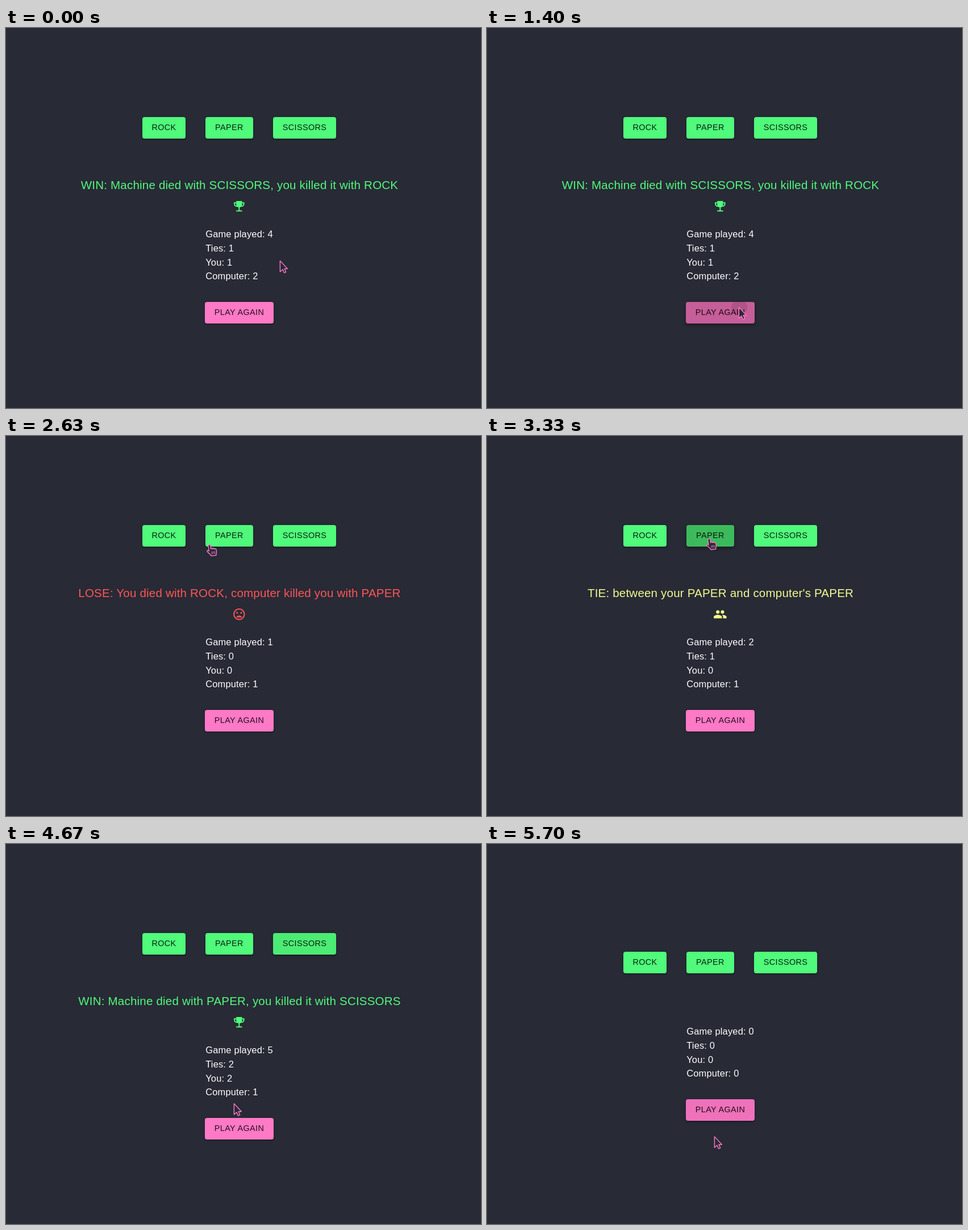
Recreate the animation shown at these times as an HTML page. Size 836 px wide and 670 px high, loop 5.77 s.

```html
<!DOCTYPE html>
<html lang="en">
<head>
<meta charset="utf-8">
<title>Rock Paper Scissors</title>
<style>
  html, body { margin: 0; width: 100%; height: 100%; overflow: hidden; background: #282a36; }
  body { position: relative; font-family: "Liberation Sans", Arial, sans-serif; cursor: default; }
  body > * { position: absolute; }
  .btn {
    height: 38px; line-height: 36.8px; border-radius: 4px; text-align: center;
    font-size: 14.4px; letter-spacing: .41px; color: rgba(0, 0, 0, .87);
  }
  #msg {
    left: 0; width: 822px; top: 261px; line-height: 31px; text-align: center;
    font-size: 20.55px; letter-spacing: .185px; white-space: nowrap;
  }
  #icon { left: 398.2px; top: 301.9px; fill: currentColor; }
  #icon .line { fill: none; stroke: currentColor; stroke-width: 2; }
  #stats {
    left: 351.2px; line-height: 24.65px; white-space: pre;
    font-size: 16.43px; letter-spacing: .19px; color: #fff;
  }
  #cursor {
    left: 0; top: 0; overflow: visible; fill: #282a36;
    stroke: #ff79c6; stroke-width: 1.4; stroke-linejoin: round;
  }
</style>
</head>
<body>
<div id="msg"></div>
<svg id="icon" width="24.65" height="24.65" viewBox="0 0 24 24"></svg>
<div id="stats"></div>
<svg id="cursor" width="24" height="24">
  <path id="arrow" transform="translate(-.6 -.6)" d="M0 0V19.3L4.5 15.4 7.2 21.4 10.3 20 7.7 14.1H13Z"/>
  <g id="hand" transform="translate(-1.5 .8) rotate(-8)">
    <path d="M-2 2C-2-.6 2-.6 2 2V8C2 6 5 6 5.2 8.3 5.5 6.8 8 7 8.2 9 8.6 8 11 8 11 10.5V14C11 16 9.5 17 9.5 20H1C0 17-3 15-5 11.5-6 9.5-4 8.5-2 11Z"/>
    <path d="M2.6 12.5v4.5M5.1 12.5v4.5M7.6 12.5v4.5" stroke-width="1"/>
  </g>
</svg>
<script>
const LOOP = 5770, SHIFT = 33.2, HEIGHT = 38;
const CLICK_DELAY = 140, HOVER_LAG = 110;
const GREEN = [80, 250, 123], PINK = [255, 121, 198];
const BEATS = { ROCK: 'SCISSORS', PAPER: 'ROCK', SCISSORS: 'PAPER' };
const $ = id => document.getElementById(id);

const KINDS = {
  WIN: ['#50fa7b', '<path d="M7 3h10v6a5 5 0 0 1-4 5v5h4v2H7v-2h4v-5a5 5 0 0 1-4-5z"/><path class="line" d="M7 6H4v2a4 4 0 0 0 4 4M17 6h3v2a4 4 0 0 1-4 4"/>'],
  LOSE: ['#ff5555', '<circle class="line" cx="12" cy="12" r="9"/><circle cx="8.5" cy="9.5" r="1.5"/><circle cx="15.5" cy="9.5" r="1.5"/><path d="M6.9 17.5a5.5 5.5 0 0 1 10.2 0z"/>'],
  TIE: ['#f1fa8c', '<circle cx="8" cy="8" r="3"/><circle cx="16" cy="8" r="3"/><path d="M1 19v-2.5C1 14.2 5.7 13 8 13s7 1.2 7 3.5V19zM15 13c1.2.8 2 2 2 3.5V19h6v-2.5c0-2.4-5-3.6-8-3.5z"/>']
};

const BUTTONS = [
  { text: 'ROCK', x: 240, y: 157, w: 76 },
  { text: 'PAPER', x: 351, y: 157, w: 84 },
  { text: 'SCISSORS', x: 470, y: 157, w: 111 },
  { text: 'PLAY AGAIN', x: 350, y: 483.3, w: 121, reset: true }
];

// pointer strokes: start, end, x, y
const MOVES = [
  [0, 0, 483, 411], [130, 620, 444, 493],
  [1480, 1930, 331, 214], [1930, 2050, 300, 211],
  [2430, 2630, 359, 191], [2630, 2820, 392, 180],
  [3960, 4030, 474, 171], [4030, 4120, 520, 176],
  [4540, 4670, 402, 458], [4670, 4860, 401, 516.5]
];

// press time and the computer's choice
const CLICKS = [
  [1290], [2110, 'PAPER'], [3040, 'PAPER'], [3480, 'ROCK'],
  [3640, 'PAPER'], [4220, 'PAPER'], [5330]
];

const clamp = v => Math.max(0, Math.min(1, v));
const mix = (a, b, k) => a + (b - a) * k;

// cubic-bezier(.4, 0, .2, 1)
function ease(x) {
  x = clamp(x);
  let lo = 0, hi = 1;
  for (let i = 0; i < 14; i++) {
    const u = (lo + hi) / 2, v = 1 - u;
    if (1.2 * u * v * v + .6 * u * u * v + u ** 3 < x) lo = u; else hi = u;
  }
  return 3 * lo * lo * (1 - lo) + lo ** 3;
}

function pointer(t) {
  let x = 0, y = 0;
  for (const [from, to, mx, my] of MOVES) {
    if (t < from) break;
    const k = clamp((t - from) / (to - from || 1));
    x = from === to ? mx : mix(x, mx, k);
    y = from === to ? my : mix(y, my, k);
  }
  return [x, y];
}

function judge(mine, theirs) {
  if (mine === theirs) return ['TIE', `TIE: between your ${mine} and computer's ${theirs}`];
  return BEATS[mine] === theirs
    ? ['WIN', `WIN: Machine died with ${theirs}, you killed it with ${mine}`]
    : ['LOSE', `LOSE: You died with ${mine}, computer killed you with ${theirs}`];
}

const rounds = [{ start: 0, ties: 1, you: 1, computer: 2, result: judge('ROCK', 'SCISSORS') }];
const roundAt = t => rounds.filter(r => r.start <= Math.max(0, t)).pop();

// without a message the column closes up around its middle
const topOf = (b, round) => b.y + (round.result ? 0 : b.reset ? -SHIFT : SHIFT);

function hit(t) {
  const [x, y] = pointer(t), round = roundAt(t - HOVER_LAG);
  return BUTTONS.find(b => {
    const dy = y - topOf(b, round);
    return x >= b.x && x <= b.x + b.w && dy >= 0 && dy <= HEIGHT;
  });
}

function setUp() {
  for (const b of BUTTONS) {
    b.el = document.createElement('div');
    b.el.className = 'btn';
    b.el.textContent = b.text;
    b.el.style.left = b.x + 'px';
    b.el.style.width = b.w + 'px';
    document.body.insertBefore(b.el, $('cursor'));
    b.rgb = b.reset ? PINK : GREEN;
    b.presses = [];
    b.toggles = [];
  }

  // play the game through
  for (const [t, theirs] of CLICKS) {
    const b = hit(t), [x, y] = pointer(t), last = roundAt(t);
    b.presses.push([t, x - b.x, y - topOf(b, last)]);
    const next = { start: t + CLICK_DELAY, ties: 0, you: 0, computer: 0 };
    if (!b.reset) {
      next.result = judge(b.text, theirs);
      const kind = next.result[0];
      next.ties = last.ties + (kind === 'TIE');
      next.you = last.you + (kind === 'WIN');
      next.computer = last.computer + (kind === 'LOSE');
    }
    rounds.push(next);
  }

  // times at which the pointer enters and leaves each button
  let over;
  for (let t = 0; t < LOOP; t += 5) {
    const now = hit(t);
    if (now === over) continue;
    if (over) over.toggles.push([t, -1]);
    if (now) now.toggles.push([t, 1]);
    over = now;
  }
}

function ripple(t, [start, x, y]) {
  const age = t - start;
  if (age < 0 || age > 450) return '';
  const p = ease(age / 550), r = 100 * p;
  const a = .87 * mix(.1, .3, p) * (1 - ease((age - 100) / 350));
  return `radial-gradient(circle at ${x}px ${y}px, rgba(0,0,0,${a.toFixed(3)}) ${r}px, transparent ${r + 1}px), `;
}

function shadow(h) {
  const m = (a, b) => mix(a, b, h) + 'px';
  return `0 ${m(3, 2)} ${m(1, 4)} ${m(-2, -1)} rgba(0,0,0,.2), ` +
    `0 ${m(2, 4)} ${m(2, 5)} rgba(0,0,0,.14), 0 1px ${m(5, 10)} rgba(0,0,0,.12)`;
}

let shown;
function showRound(round) {
  if (round === shown) return;
  shown = round;
  const { ties, you, computer, result } = round;
  const [kind, text] = result || ['', ''];
  const [color, icon] = KINDS[kind] || ['', ''];
  $('msg').textContent = text;
  $('msg').style.color = $('icon').style.color = color;
  $('icon').innerHTML = icon;
  $('stats').textContent =
    `Game played: ${ties + you + computer}\nTies: ${ties}\nYou: ${you}\nComputer: ${computer}`;
  $('stats').style.top = 351.4 - (result ? 0 : SHIFT) + 'px';
  for (const b of BUTTONS) b.el.style.top = topOf(b, round) + 'px';
}

function draw(t) {
  showRound(roundAt(t));

  for (const b of BUTTONS) {
    const h = b.toggles.reduce((sum, [at, sign]) => sum + sign * ease((t - at) / 250), 0);
    const rgb = b.rgb.map(c => Math.round(c * (1 - .225 * h)));
    const waves = b.presses.map(p => ripple(t, p)).join('');
    b.el.style.background = `${waves}linear-gradient(rgb(${rgb}), rgb(${rgb}))`;
    b.el.style.boxShadow = shadow(h);
  }

  const [x, y] = pointer(t), over = hit(t), hand = over && !over.reset;
  $('cursor').style.transform = `translate(${x}px, ${y}px)`;
  $('hand').style.display = hand ? '' : 'none';
  $('arrow').style.display = hand ? 'none' : '';
}

setUp();
const begin = performance.now();
function tick() {
  draw((performance.now() - begin) % LOOP);
  requestAnimationFrame(tick);
}
tick();
</script>
</body>
</html>
```
